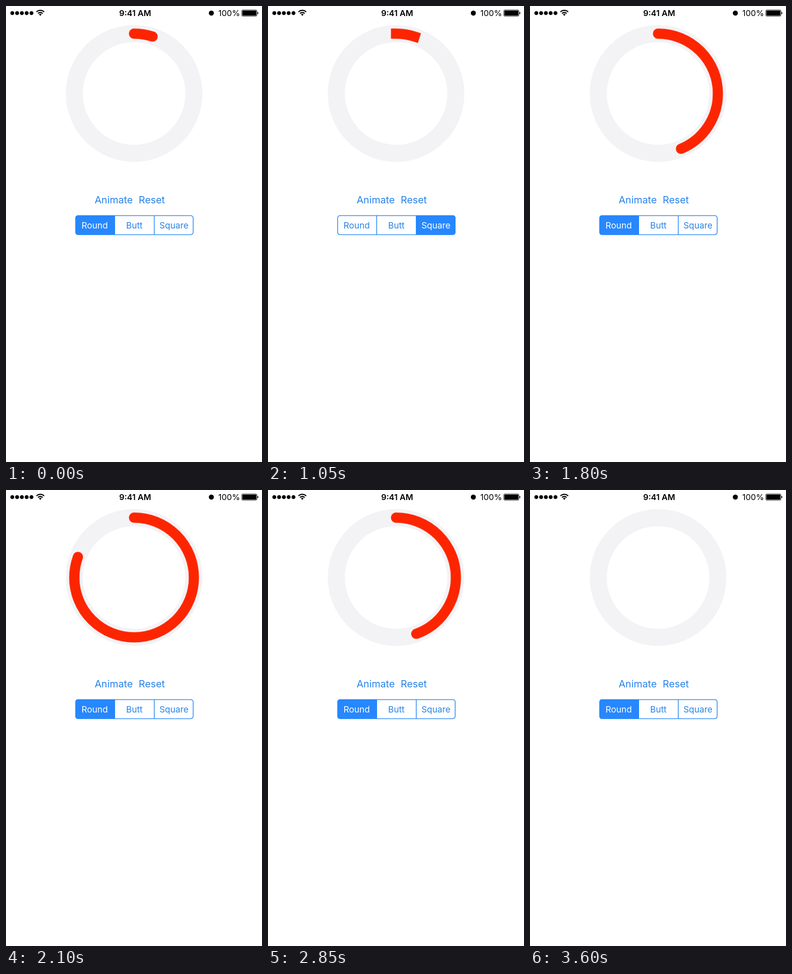
These frames come from a looping animation (561 by 998 pixels, 3750 ms). An HTML page:

```html
<!DOCTYPE html>
<html lang="en">
<head>
<meta charset="utf-8">
<title>Progress ring line caps</title>
<style>
  html, body { margin: 0; width: 100%; height: 100%; overflow: hidden; background: #fff; }
  svg { display: block; width: 100vw; height: 100vh; }
  text { font-family: Inter, Roboto, "Liberation Sans", sans-serif; text-anchor: middle; }

  .status { font-size: 17.9px; fill: #000; }
  .time { font-weight: 600; }
  .button { font-size: 21.7px; fill: #2a83e8; }
  .segment { font-size: 19px; }
  .outline { fill: none; stroke: #2787f8; stroke-width: 1.6; }

  .track, .value { fill: none; }
  .track { stroke: #f3f3f6; stroke-width: 37.4; }
  .value {
    stroke: #fc2500; stroke-width: 22.4;
    animation: sweep 3750ms infinite, cap 3750ms step-end infinite;
  }

  /* The picture advances every 150 ms, 4% of the loop */
  @keyframes sweep {
    0%   { stroke-dasharray: 5 200; animation-timing-function: step-end; }
    40%  { stroke-dasharray: 6.9 200; animation-timing-function: steps(5, end); }
    60%  { stroke-dasharray: 99 200; animation-timing-function: step-end; }
    64%  { stroke-dasharray: 100 200; animation-timing-function: step-end; }
    68%  { stroke-dasharray: 83.3 200; animation-timing-function: steps(4, end); }
    84%  { stroke-dasharray: 5.7 200; animation-timing-function: step-end; }
    100% { stroke-dasharray: 5 200; }
  }
  @keyframes cap {
    0%   { stroke-linecap: round; opacity: 1; }
    16%  { stroke-linecap: butt; }
    28%  { stroke-linecap: square; }
    36%  { stroke-linecap: round; }
    88%  { opacity: 0; }
    100% { stroke-linecap: round; opacity: 1; }
  }

  .segment {
    --on: #2787ff; --off: #fff; --ink: #2a83e8;
    animation: 3750ms step-end infinite;
  }
  .segment rect { fill: #fff; animation: 3750ms step-end infinite; }
  .segment text { fill: #2a83e8; animation: 3750ms step-end infinite; }
  .round rect { animation-name: round-fill; }
  .round text { animation-name: round-ink; }
  .butt rect { animation-name: butt-fill; }
  .butt text { animation-name: butt-ink; }
  .square rect { animation-name: square-fill; }
  .square text { animation-name: square-ink; }

  @keyframes round-fill {
    0%, 36%, 100% { fill: #2787ff; }
    16% { fill: #4ca5ff; }
    20% { fill: #fff; }
  }
  @keyframes round-ink {
    0%, 36%, 100% { fill: #fff; }
    16% { fill: #b4dafe; }
    20% { fill: #2a83e8; }
  }
  @keyframes butt-fill {
    0%, 28%, 100% { fill: #fff; }
    16% { fill: #a8d1ff; }
    20% { fill: #2787ff; }
  }
  @keyframes butt-ink {
    0%, 28%, 100% { fill: #2a83e8; }
    16% { fill: #84bbf8; }
    20% { fill: #fff; }
  }
  @keyframes square-fill {
    0%, 36%, 100% { fill: #fff; }
    28% { fill: #2787ff; }
  }
  @keyframes square-ink {
    0%, 36%, 100% { fill: #2a83e8; }
    28% { fill: #fff; }
  }
</style>
</head>
<body>
<svg viewBox="0 0 561 998">
  <defs>
    <clipPath id="pill"><rect x="152" y="458" width="259" height="43" rx="6"/></clipPath>
  </defs>

  <!-- Status bar -->
  <g class="status">
    <path d="M13.8 15.5h42.1" fill="none" stroke="#000" stroke-width="8.6"
          stroke-linecap="round" stroke-dasharray="0 10.5"/>
    <g fill="none" stroke="#000" stroke-width="2.4">
      <path d="M66.7 13A12 12 0 0 1 83.7 13"/>
      <path d="M70.1 16.4A7.2 7.2 0 0 1 80.3 16.4"/>
    </g>
    <path d="M75.2 21.6L72.2 18.6A4.3 4.3 0 0 1 78.2 18.6Z"/>
    <text class="time" x="283" y="22">9:41 AM</text>
    <circle cx="450" cy="15.5" r="5.5"/>
    <text x="489" y="22">100%</text>
    <rect x="516.7" y="8.7" width="33.1" height="13.6" rx="2.2" fill="none" stroke="#000"/>
    <rect x="518" y="10" width="30.5" height="11" rx="1"/>
    <path d="M551 13q2 .4 2 2.5t-2 2.5z"/>
  </g>

  <!-- Ring -->
  <circle class="track" cx="280.7" cy="191.5" r="131"/>
  <circle class="value" cx="280.7" cy="191.5" r="131" pathLength="100"
          transform="rotate(-90 280.7 191.5)"/>

  <!-- Controls -->
  <text class="button" x="236" y="432">Animate</text>
  <text class="button" x="319.5" y="432">Reset</text>
  <g clip-path="url(#pill)">
    <g class="segment round"><rect x="152" y="458" width="86.5" height="43"/><text x="194.3" y="486.5">Round</text></g>
    <g class="segment butt"><rect x="238.5" y="458" width="86" height="43"/><text x="281.3" y="486.5">Butt</text></g>
    <g class="segment square"><rect x="324.5" y="458" width="86.5" height="43"/><text x="368" y="486.5">Square</text></g>
  </g>
  <path class="outline" d="M238.2 458.5v42M324.8 458.5v42"/>
  <rect class="outline" x="152.6" y="458.7" width="257.6" height="41.8" rx="5.4"/>
</svg>
</body>
</html>
```
